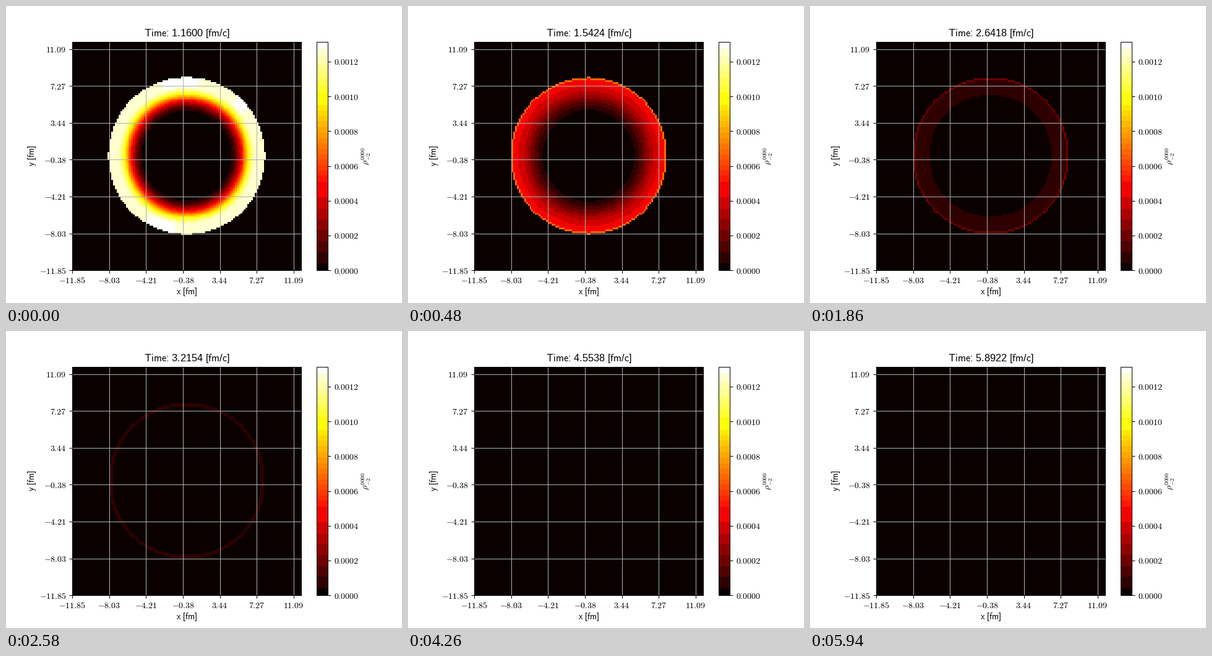
Animation of 640x480 px, one loop 6000 ms. Source, as a matplotlib script:

```python
import numpy as np
import matplotlib.pyplot as plt
from matplotlib.animation import FuncAnimation
from matplotlib.cm import ScalarMappable
from matplotlib.colors import ListedColormap, Normalize

LINE = 0.72  # one pixel, in points
plt.rcParams.update({
    "font.family": "Liberation Sans",
    "mathtext.fontset": "cm",
    "axes.linewidth": LINE,
    "grid.linewidth": LINE,
    "xtick.major.width": LINE,
    "ytick.major.width": LINE,
})

FRAMES, INTERVAL = 100, 60
T0, DT = 1.16, 0.0478
CELLS, CELL = 124, 0.1912
HALF = CELLS * CELL / 2
VMAX = 0.001315

# Cell centres, counted in cells from the middle of the grid.
axis = np.arange(CELLS) - (CELLS - 1) / 2
X, Y = np.meshgrid(axis, axis)
R = np.hypot(X, Y)
ANGLE = np.degrees(np.arctan2(Y, X)) % 360


def stepped_hot():
    """The hot colormap merged into 3-4-3 bit RGB steps."""
    rgb = plt.get_cmap("hot")(np.linspace(0, 1, 256))[:, :3]
    steps = np.floor(np.round(rgb * 255) / [32, 16, 32])
    _, group = np.unique(steps, axis=0, return_inverse=True)
    group = group.ravel()
    out = np.array([rgb[group == g].mean(axis=0) for g in group])
    out[group == group[0]] = rgb[0]
    out[group == group[-1]] = 1
    return ListedColormap(out)


def erode(mask):
    out = mask.copy()
    for dim in (0, 1):
        for shift in (-1, 1):
            out &= np.roll(mask, shift, axis=dim)
    return out


def bump(center, width):
    return np.exp(-((ANGLE - center) / width) ** 2)


HOT_SPOTS = (bump(95, 17) + bump(250, 13) + bump(43, 7)) * (R > 37)


def density(i):
    # The ring decays while its inner slope gets wider.
    peak = 0.95 * (1 + 0.08 * i) ** -2.14
    rim = 0.95 * (1 + 0.02 * i) ** -3.95
    s = np.clip((R - 20.8) / (17.1 + 0.27 * i), 0, 1)
    rho = peak * (s * s * (3 - 2 * s)) ** (1 + 0.5 * np.exp(-i / 4))

    # The disk shrinks a little; its outermost cells decay more slowly.
    rx = 42.47 + 0.08 * np.exp(-i / 3)
    ry = 42.47 + 0.17 * np.exp(-i / 7)
    disk = (X / rx) ** 2 + (Y / ry) ** 2 < 1
    inner = erode(disk)
    core = erode(inner)
    weight = np.where(core, 0, np.where(inner, 0.15, 1))
    rho += (rim - rho) * weight
    rho *= 1 + 0.04 * HOT_SPOTS * np.exp(-i / 3)
    return np.where(disk, rho, 0) * VMAX


def title_text(i):
    return rf"$\mathsf{{Time}}$: {T0 + DT * i:.4f} [$\mathsf{{fm}}$/$\mathsf{{c}}$]"


fig, ax = plt.subplots(figsize=(6.4, 4.8), dpi=100)
cmap, norm = stepped_hot(), Normalize(0, VMAX)
image = ax.imshow(density(0), cmap=cmap, norm=norm, origin="lower",
                  interpolation="nearest", extent=(-HALF, HALF, -HALF, HALF))

ticks = -HALF + 20 * CELL * np.arange(7)
labels = [f"${t:.2f}$" for t in ticks]
ax.set_xticks(ticks, labels)
ax.set_yticks(ticks, labels)
ax.grid(True, color="#b0b0b0")
ax.set_xlabel(r"$\mathsf{x}$ [$\mathsf{fm}$]", labelpad=1.8)
ax.set_ylabel(r"$\mathsf{y}$ [$\mathsf{fm}$]", labelpad=1.8)
title = ax.set_title(title_text(0), fontsize=11.8)

bar = fig.colorbar(ScalarMappable(norm, cmap), ax=ax)
bar_ticks = np.arange(7) * 0.0002
bar.set_ticks(bar_ticks, labels=[f"${t:.4f}$" for t in bar_ticks])
bar.set_label(r"$\rho_{-2}^{0000}$", labelpad=2.3)


def update(i):
    image.set_data(density(i))
    title.set_text(title_text(i))
    return image, title


anim = FuncAnimation(fig, update, frames=FRAMES, interval=INTERVAL,
                     repeat=True, repeat_delay=0, blit=False)
plt.show()
```
